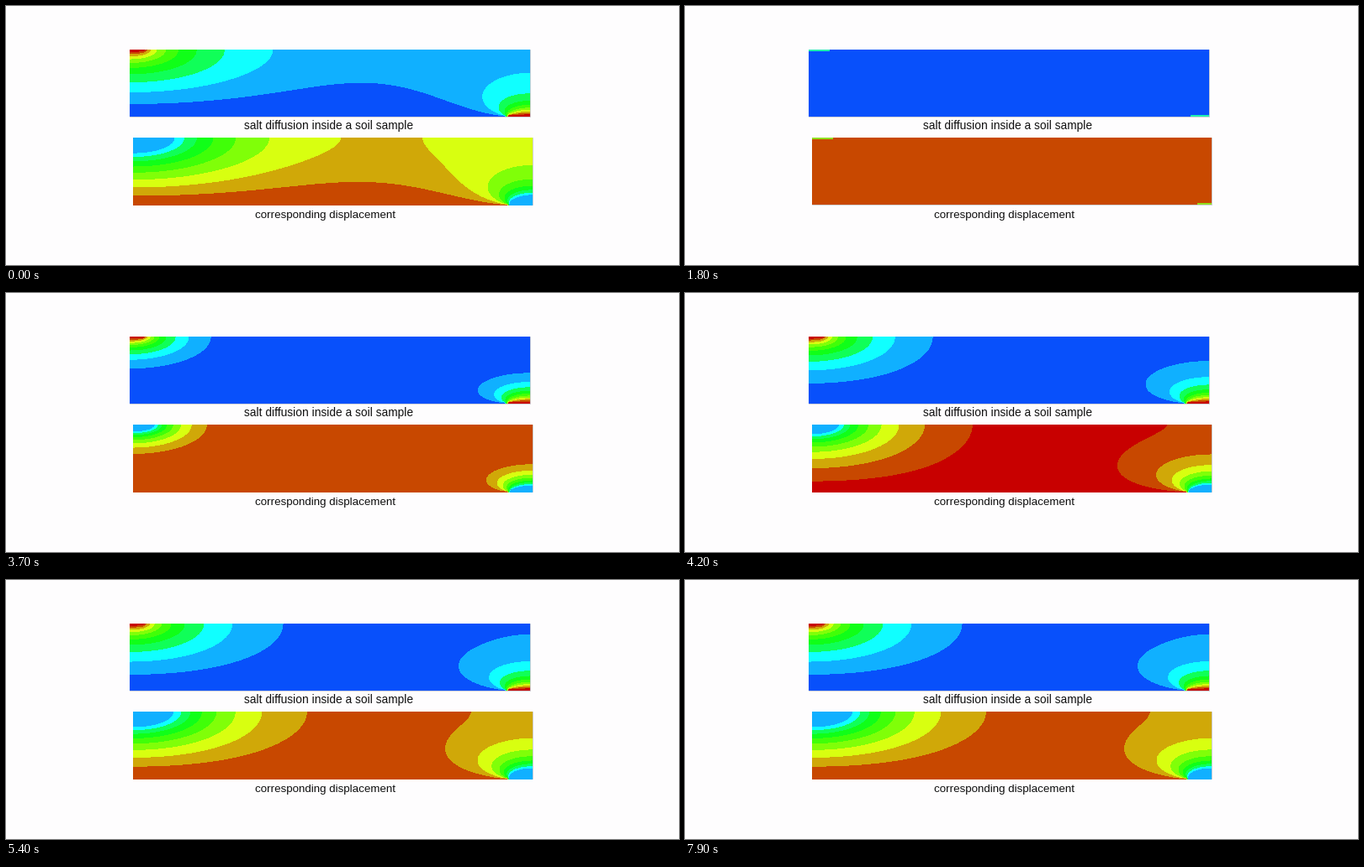
These frames come from a looping animation (800 by 309 pixels, 8000 ms). A matplotlib script:

```python
import numpy as np
import matplotlib.pyplot as plt
from matplotlib.animation import FuncAnimation
from matplotlib.patches import Rectangle

W, H, DPI = 800, 309, 100
FRAMES, INTERVAL = 80, 100

BANDS = ["#0000f8", "#0850fb", "#10b0ff", "#10ffff", "#10ff58", "#10ff18",
         "#40ff08", "#80ff08", "#d8ff10", "#d0a808", "#c84800", "#c80000"]

# left, top, right, bottom
SALT = (147, 52.3, 623, 131.5)
DISP = (151, 157, 626, 237.3)

# Diffusion grid: the soil conducts STRETCH times further sideways
LENGTH, DEPTH, STRETCH = 476, 79, 2.5
NY = 40
NX = round(NY * LENGTH / DEPTH / STRETCH)
XS = np.linspace(0, LENGTH, NX + 1)
RATE = 0.24
FIRST = 1 / 11

fig = plt.figure(figsize=(W / DPI, H / DPI), dpi=DPI, facecolor="#fefdfe")
ax = fig.add_axes([0, 0, 1, 1])


def diffuse(reaches, last):
    """Yield the field when its outer contour passes each reach, then the
    nearly settled one after `last` depth-squared units of time."""
    pad = np.zeros((NY + 3, NX + 3))
    u = pad[1:-1, 1:-1]
    inlet, outlet = XS <= 16, XS >= LENGTH - 25
    waiting = list(reaches)
    for _ in range(int(last * NY ** 2 / RATE)):
        u[0, inlet] = 1
        u[-1] = outlet
        pad[0], pad[:, 0], pad[:, -1] = pad[2], pad[:, 2], pad[:, -3]
        u += RATE * (pad[:-2, 1:-1] + pad[2:, 1:-1]
                     + pad[1:-1, :-2] + pad[1:-1, 2:] - 4 * u)
        if waiting and np.interp(waiting[0], XS, u[0]) >= FIRST:
            waiting.pop(0)
            yield settle(u, inlet, outlet)
    yield settle(u, inlet, outlet)


def settle(u, inlet, outlet):
    v = u.copy()
    v[0, inlet] = 1
    v[-1] = outlet
    return v


def bands(box, field, first, step, colors):
    x, y, r, b = box
    inner = first + step * np.arange(len(colors) - 1)
    return ax.contourf(np.linspace(x, r, NX + 1), np.linspace(y, b, NY + 1),
                       field, levels=[-1, *inner, 2], colors=colors)


def rect(x, y, r, b, color):
    return ax.add_patch(Rectangle((x, y), r - x, b - y, fc=color, ec="none"))


def strips(box, color, h, foot):
    x, y, r, b = box
    return [rect(x, y, x + 25, y + h, color),
            rect(r - foot, b - h, r, b, color)]


def stage(field, top, first, step):
    """Salt rises through the bands, displacement falls from band `top`."""
    return [bands(SALT, field, FIRST, FIRST, BANDS[1:]),
            bands(DISP, field, first, step, BANDS[top:1:-1])]


for x, y, r, b in (SALT, DISP):
    ax.add_patch(Rectangle((x, y), r - x, b - y, fc="none", ec="#c8c8d0",
                           lw=0.6, zorder=0))

early, middle, grown, settled = diffuse([96, 147, 182], 2)

STAGES = [
    stage(settled, 10, 0.067, 0.062),
    [rect(*SALT, BANDS[2]), rect(*DISP, BANDS[0])]
    + strips(SALT, "#8a8878", 0.9, 22),
    [rect(*SALT, BANDS[1]), rect(*DISP, BANDS[10])]
    + strips(SALT, "#20f0b0", 2, 22) + strips(DISP, "#90e020", 2, 17),
    stage(early, 10, 0.115, 0.070),
    stage(middle, 11, 0.045, 0.067),
    stage(grown, 10, 0.070, 0.056),
]
STARTS = [0, 5, 14, 23, 42, 54]

for x, y, px, words in [
        (283.2, 146.6, 13.75, "salt diffusion inside a soil sample"),
        (296.5, 253.4, 13.45, "corresponding displacement")]:
    ax.text(x, y, words, family="Liberation Sans", fontsize=px * 72 / DPI,
            color="#101010", va="baseline")

ax.set_xlim(0, W)
ax.set_ylim(H, 0)
ax.axis("off")


def update(frame):
    now = np.searchsorted(STARTS, frame, side="right") - 1
    for i, artists in enumerate(STAGES):
        for artist in artists:
            artist.set_visible(i == now)
    return []


anim = FuncAnimation(fig, update, frames=FRAMES, interval=INTERVAL,
                     init_func=lambda: update(0), repeat=True,
                     repeat_delay=0, blit=False)
plt.show()
```
